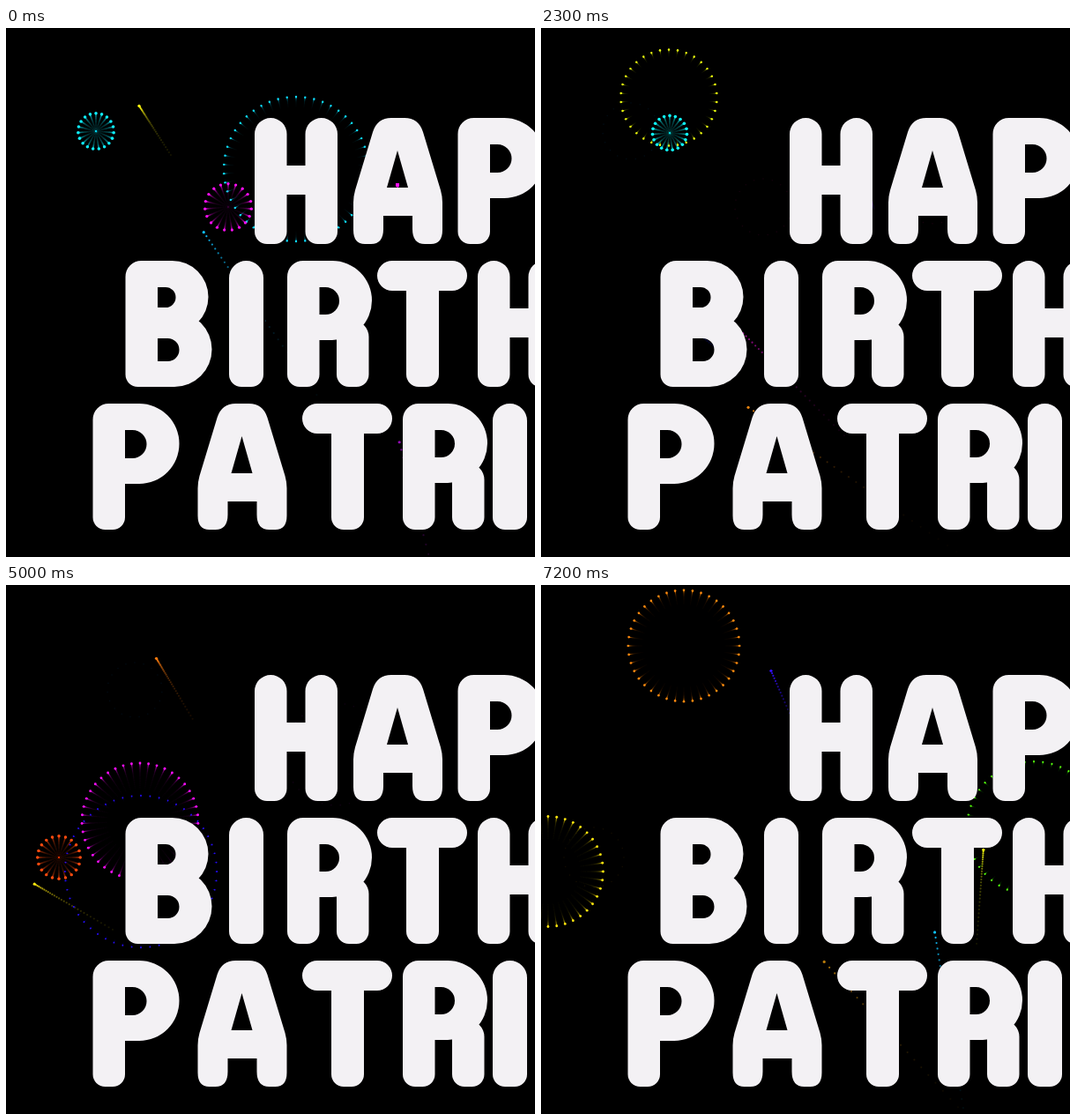
An HTML page with a canvas that plays this animation: 600 by 600 pixels, repeating every 7.3 s.

```html
<!DOCTYPE html>
<html lang="en">
<head>
<meta charset="utf-8">
<title>Happy Birthday</title>
<style>
  html, body { margin: 0; width: 100%; height: 100%; overflow: hidden; background: #000; }
  canvas { display: block; }
</style>
</head>
<body>
<canvas id="stage" width="600" height="600" role="img" aria-label="HAPPY BIRTHDAY PATRICK"></canvas>
<script>
const ctx = document.getElementById('stage').getContext('2d');
const LOOP = 7300, STEP = 100;
const CAP = 143, STEM = 36.5;

// Rounded display lettering built from stems, bars and bowls.
const stem = (p, x = 0, w = STEM, y = 0) =>
  p.roundRect(x, y, w, CAP - y, [w / 2, w / 2, 14, 14]);

function bowl(p, top, bottom, right) {
  const h = bottom - top, inner = h - 59, left = 35, width = right - 37 - left;
  p.roundRect(0, top, right, h, [18, h / 2, h / 2, 14]);
  // A negative width reverses the winding, which cuts the counter out.
  p.roundRect(left + width, top + 30, -width, inner, [inner / 2, 0, 0, inner / 2]);
}

const glyphs = {
  H: { advance: 112, build(p) { stem(p); stem(p, 57.5); p.rect(18, 54, 58, 33); } },
  I: { advance: 66, build(p) { stem(p, 0, 39); } },
  T: { advance: 114, build(p) { p.roundRect(0, 0, 102, 34, 17); stem(p, 33, 37); } },
  P: { advance: 119, build(p) { stem(p); bowl(p, 0, 91, 98); } },
  B: { advance: 117.5, build(p) { stem(p); bowl(p, 0, 82, 94); bowl(p, 58, CAP, 98); } },
  R: { advance: 102, build(p) { stem(p); bowl(p, 0, 90, 96); stem(p, 56, STEM, 68); } },
  A: { advance: 118.5, build(p) {
    p.addPath(new Path2D('M34 111V126Q34 143 20 143H13Q0 143 0 127V96Q0 89 2 82L22 16Q27 0 43 0' +
      'H58Q74 0 79 16L99 82Q101 89 101 96V127Q101 143 88 143H81Q67 143 67 126V111zM50 37L38 79H62z'));
  } }
};

const lettering = new Path2D();
[['HAP', 282], ['BIRTH', 135.5], ['PATRI', 98.5]].forEach(([word, x], row) => {
  for (const letter of word) {
    const glyph = new Path2D();
    glyphs[letter].build(glyph);
    lettering.addPath(glyph, new DOMMatrix([1, 0, 0, 1, x, 102 + 162 * row]));
    x += glyphs[letter].advance;
  }
});

// Burst time in seconds, centre, final radius, hue
const fireworks = [
  [-1.5, 329, 160, 84, 173],
  [-0.7, 252, 203, 32, 295],
  [-0.4, 102, 117, 32, 180],
  [0, 444, 178, 44, 302],
  [0.82, 145, 79, 56, 50],
  [1.9, 146, 119, 31, 177],
  [2.43, 374, 192, 58, 264],
  [3.1, 153, 325, 87, 228],
  [3.94, 152, 268, 71, 289],
  [4.5, 60, 309, 34, 10],
  [5.49, 559, 276, 77, 85],
  [5.94, 162, 69, 66, 18],
  [6.12, 8, 325, 67, 43],
  [8.35, 504, 270, 50, 50],
  [8.6, 239, 47, 50, 235],
  [9.2, 421, 236, 50, 175],
  [9.6, 134, 224, 50, 15]
];
const LAUNCH = { x: 480, y: 600 };
const TRAIL = 30, TRAIL_STEP = 0.025;

const clamp = v => Math.max(0, Math.min(1, v));

function dot(x, y, r) {
  ctx.beginPath();
  ctx.arc(x, y, r, 0, 2 * Math.PI);
  ctx.fill();
}

// The rocket slows down cubically towards the centre of its burst.
function drawRocket(x, y, left, echo) {
  const heading = Math.atan2(LAUNCH.y - y, LAUNCH.x - x);
  const d = 20 * left ** 3;
  ctx.globalAlpha = clamp((3.2 - left) / 1.1) * 0.92 ** echo;
  dot(x + d * Math.cos(heading), y + d * Math.sin(heading), echo ? 1.1 : 1.6);
}

function drawRing(x, y, radius, past, age, echo) {
  const r = radius * (1 - Math.exp(-past / 0.4));
  const count = Math.round(radius * 0.6);
  const life = clamp((2.2 - age) / 0.35);
  const size = 0.8 + 1.2 * clamp(1 - age / 2.2);
  ctx.globalAlpha = echo ? 0.42 * life * 0.91 ** echo : 0.08 + 0.92 * life;
  for (let k = 0; k < count; k++) {
    const a = 2 * Math.PI * k / count - Math.PI / 2;
    dot(x + r * Math.cos(a), y + r * Math.sin(a), echo ? size * 0.55 : size);
  }
}

function drawFirework([burst, x, y, radius, hue], t) {
  const age = t - burst;
  if (age < -3.2 || age > 3.2) return;
  ctx.fillStyle = `hsl(${hue + 10 * Math.abs(age)} 100% 53%)`;
  for (let echo = TRAIL; echo >= 0; echo--) {
    const past = age - echo * TRAIL_STEP;
    if (past < 0) drawRocket(x, y, -past, echo);
    else drawRing(x, y, radius, past, age, echo);
  }
}

function draw(now) {
  const t = Math.floor(now % LOOP / STEP) * STEP / 1000;
  ctx.globalAlpha = 1;
  ctx.fillStyle = '#000';
  ctx.fillRect(0, 0, 600, 600);
  for (const firework of fireworks) drawFirework(firework, t);
  ctx.globalAlpha = 1;
  ctx.fillStyle = '#f3f1f4';
  ctx.fill(lettering);
  requestAnimationFrame(draw);
}
requestAnimationFrame(draw);
</script>
</body>
</html>
```
